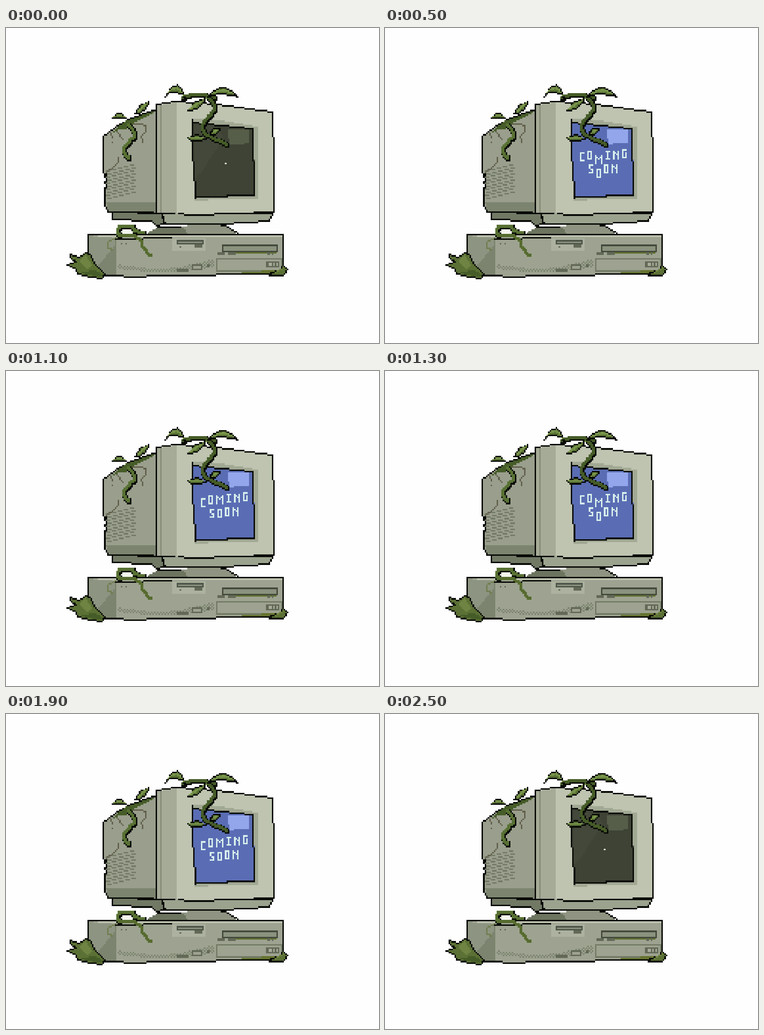
Write an HTML page with a canvas that moves like this. It is 815 px wide and 687 px high and loops after 3000 ms.

```html
<!DOCTYPE html>
<html lang="en">
<head>
<meta charset="utf-8">
<title>Coming soon</title>
<style>
html, body { margin: 0; width: 100%; height: 100%; overflow: hidden; background: #fefefe; }
canvas { display: block; width: 100vw; height: 100vh; image-rendering: pixelated; }
</style>
</head>
<body>
<canvas id="stage" width="247" height="208" role="img" aria-label="Overgrown computer: coming soon"></canvas>
<script>
const ctx = document.getElementById('stage').getContext('2d');
const CELL = 3.3, LOOP = 3000, STEP = 100;
const BLACK = '#080a06', DEEP = '#465c28', LEAF = '#587133', LIGHT = '#78944a';
const FRONT = '#9da390', SIDE = '#9a9f8d', SHADE = '#7c846f', BEZEL = '#bec4b0', MARK = '#626956';
const cell = v => Math.floor(v / CELL);
const points = p => typeof p === 'string' ? p.split(' ').map(xy => xy.split(',').map(Number)) : p;

function dot(x, y, color, w = 1, h = 1) {
  ctx.fillStyle = color;
  ctx.fillRect(x, y, w, h);
}

// Shapes use stage coordinates and land on whole art pixels.
function fill(outline, color, test) {
  const pts = points(outline).map(([x, y]) => [x / CELL, y / CELL]);
  const ys = pts.map(p => p[1]);
  for (let y = Math.floor(Math.min(...ys)); y <= Math.max(...ys); y++) {
    const hits = [];
    pts.forEach(([x1, y1], i) => {
      const [x2, y2] = pts[(i + 1) % pts.length], c = y + .5;
      if ((y1 <= c) !== (y2 <= c)) hits.push(x1 + (c - y1) * (x2 - x1) / (y2 - y1));
    });
    hits.sort((a, b) => a - b);
    for (let i = 0; i < hits.length; i += 2) {
      const a = Math.round(hits[i]), b = Math.round(hits[i + 1]);
      if (!test) dot(a, y, color, b - a);
      else for (let x = a; x < b; x++) if (test(x, y)) dot(x, y, color);
    }
  }
}

function stroke(cells, color, width = 1) {
  const r = Math.floor(width / 2);
  for (let i = 1; i < cells.length; i++) {
    const [x1, y1] = cells[i - 1], [x2, y2] = cells[i];
    const n = Math.max(Math.abs(x2 - x1), Math.abs(y2 - y1), 1);
    for (let k = 0; k <= n; k++)
      dot(Math.round(x1 + (x2 - x1) * k / n) - r, Math.round(y1 + (y2 - y1) * k / n) - r, color, width, width);
  }
}

const line = (path, color = BLACK, width) => stroke(points(path).map(p => p.map(cell)), color, width);

function box(x, y, w, h, color, inner) {
  const a = cell(x), b = cell(y), c = Math.round(w / CELL), d = Math.round(h / CELL);
  dot(a, b, color, c, d);
  if (inner) dot(a + 1, b + 1, inner, c - 2, d - 2);
}

function shape(outline, color) {
  const pts = points(outline);
  fill(pts, color);
  line([...pts, pts[0]]);
}

// Catmull-Rom curve through a few points
function smooth(path) {
  const p = points(path), curve = [];
  for (let i = 0; i < p.length - 1; i++) {
    const [a, b, c, d] = [p[i - 1] || p[i], p[i], p[i + 1], p[i + 2] || p[i + 1]];
    for (let t = 0; t < 1; t += .2)
      curve.push([0, 1].map(k => b[k] + t / 2 * (c[k] - a[k]
        + t * (2 * a[k] - 5 * b[k] + 4 * c[k] - d[k] + t * (3 * (b[k] - c[k]) + d[k] - a[k])))));
  }
  return [...curve, p[p.length - 1]];
}

function vine(path, core = LEAF) {
  const curve = smooth(path);
  line(curve, BLACK, 3);
  line(curve, core, 2);
}

// A leaf swells around an arched spine, lit along its upper half.
function leaf(x1, y1, x2, y2, width, bend = 0) {
  const dx = x2 - x1, dy = y2 - y1, len = Math.hypot(dx, dy);
  const at = (t, side) => {
    const off = bend * 4 * t * (1 - t) + side * width * Math.sin(Math.PI * t);
    return [x1 + dx * t - dy / len * off, y1 + dy * t + dx / len * off];
  };
  const steps = Array.from({ length: 11 }, (_, i) => i / 10);
  const blade = (top, bottom) => [...steps.map(t => at(t, top)), ...steps.map(t => at(1 - t, bottom))];
  shape(blade(-1, 1), LEAF);
  fill(blade(-.6, .2), LIGHT);
}

function drawCase() {
  fill('181,451 605,451 605,537 455,537 305,542 215,541 181,510', FRONT);
  fill('181,453 241,458 241,542 215,541 181,505', '#8d9481');
  fill('241,470 241,542 215,541 200,520', SHADE);
  fill('183,452 604,452 604,457 240,457', '#bcc2ae');
  fill('243,515 320,525 375,522 455,504 455,520 395,530 320,532 243,525', SHADE, (x, y) => (x + y) % 2);

  box(366, 459, 73, 26, '#acb29f');
  box(373, 462, 59, 11, '#50574a', '#8a917d');
  box(380, 476, 3.3, 3.3, MARK);
  box(413, 475, 17, 8, MARK, '#a8ae9b');
  box(472, 472, 122, 17, '#444a3c', '#8b927e');
  line('500,490 588,490', '#61702f');
  [462, 488].forEach(x => box(x, 491, 18, 8, MARK, FRONT));
  [571, 577, 584].forEach(x => box(x, 491, 3.3, 7, MARK));

  box(459, 502, 144, 30, '#747c67', FRONT);
  box(568, 509, 29, 13, MARK, '#a6ac99');
  [574, 581, 588].forEach(x => box(x, 512, 3.3, 7, MARK));
  line('520,535 600,532', '#64732f', 2);
  box(376, 525, 27, 7, MARK);
  box(409, 515, 23, 13, MARK, FRONT);
  box(439, 515, 7, 8, MARK);
  [251, 262].forEach(x => box(x, 469, 3.3, 3.3, MARK));

  line('240,459 240,540', SHADE);
  line('181,497 181,451 605,451 605,516');
  line('240,459 362,457');
  line('213,540 305,542 308,540 453,540 460,537 575,537');
}

function drawMonitor() {
  fill('304,450 326,437 385,431 470,428 487,437 507,450', '#8e9481');
  fill('304,450 326,437 385,434 400,450', '#6c745f');
  line('470,430 480,430 508,448');
  line('332,434 382,434');

  shape('214,237 239,216 268,199 327,180 329,402 222,400 216,386 219,318 214,315', SIDE);
  fill('219,380 327,380 327,401 224,400', SHADE);
  shape('232,402 340,403 346,427 328,430 318,422 234,417', '#717965');
  shape('340,404 581,404 577,422 470,427 347,428', '#9ba28e');

  shape('327,168 372,159 460,166 583,184 586,292 586,402 410,407 329,402', BEZEL);
  fill('331,169 372,162 372,400 378,405 331,401', '#a5ab97');
  line('338,170 338,401', '#858c77');
  fill('407,198 460,200 550,215 550,373 413,375', '#a1a893');

  for (let row = 0; row < 10; row++)
    for (let col = 0; col < 5; col++)
      box(221 + col * 13.2 + row % 2 * 3.3, 313 - col * 3.3 + row * 6.6, 10, 3.3, '#747b67');
  for (let y = 322; y < 374; y += 13.2) box(216, y, 3.3, 6.6, BLACK);

  ['275,208 298,208 305,213 305,226 296,235 298,249', '245,282 245,291 235,303 220,314',
   '228,228 232,239', '240,222 256,242', '232,248 232,248'].forEach(p => line(p, '#62604c'));
}

// The picture opens from the middle line in four steps and closes the same way.
function drawScreen(step) {
  const glass = '409,207 540,219 543,292 543,366 484,366 484,369 413,369 409,290';
  const open = Math.min(step, 24 - step, 4);
  fill(glass, '#3e4335');
  fill('412,210 460,214 475,240 430,310 412,330', '#43483a');
  fill('485,222 530,222 530,252 488,254', '#565d48');
  if (open === 4) {
    fill(glass, '#5a6db4');
    fill('485,221 530,221 530,251 488,253', '#94a6eb');
  } else if (open > 0) {
    const half = open === 1 ? 2 : 19.5 * open, top = 291 - half, bottom = 291 + half;
    fill([[411, top], [541, top], [541, bottom], [412, bottom]], '#5a6db4');
  }
  if (open > 1) drawText(step);
  if (step < 1 || step > 24) dot(145, 89, '#eef1e8');
  line('407,200 407,288 412,293 412,330 414,335 414,371');
  line('414,368 483,368 485,365 543,365 543,292 540,289 540,219 505,216 440,209 409,207');
}

// Letters are strokes on a small grid, six rows high.
const GLYPHS = {
  C: '2,0 0,0 0,5 2,5', O: '0,0 2,0 2,5 0,5 0,0', M: '0,5 0,0 2,2 4,0 4,5', I: '0,0 2,0 1,0 1,5 0,5 2,5',
  N: '0,5 0,0 3,3 3,0 3,5', G: '2,0 0,0 0,5 2,5 2,2', S: '2,0 0,0 0,2 2,3 2,5 0,5'
};

// A dip runs through the columns every 800 ms, each letter hopping up behind it.
function drawText(step) {
  const phase = (step + 5) % 8;
  const word = (text, x, y, first) => [...text].forEach((letter, i) => {
    const col = first + i, since = phase - Math.min(col, 4);
    const top = Math.round(y - .4 * col) + (since === 0 ? 2 : since === 1 ? -1 : 0);
    const path = points(GLYPHS[letter]);
    stroke(path.map(([px, py]) => [x + px, top + py]), '#d9f0ed');
    x += Math.max(...path.map(p => p[0])) + 3;
  });
  word('COMING', 129, 82.4, 0);
  word('SOON', 135, 91.6, 1);
}

function drawPlants() {
  // Side of the monitor
  fill('228,231 260,203 322,179 322,186 279,207 278,218 248,221', DEEP);
  line('266,198 322,179');
  vine('270,212 283,235 264,255 260,272 269,285');
  leaf(233, 195, 263, 195, 5, -4);
  leaf(283, 188, 312, 161, 6);

  // Top of the monitor
  vine('388,154 410,147 438,148 456,152', DEEP);
  vine('440,151 456,169 452,186 433,207 433,228 451,240 484,255', DEEP);
  leaf(348, 149, 391, 155, 7, -20);
  leaf(442, 149, 506, 150, 7, -12);
  leaf(397, 181, 438, 153, 7);
  leaf(398, 240, 436, 241, 7);
  leaf(446, 233, 467, 219, 6);

  // On the case
  line(smooth('238,458 223,466 224,479 234,483'), '#727e52');
  fill('250,440 275,438 284,449 252,451', '#f4f5ee');
  vine('302,447 286,444 275,434 253,434 246,445 250,453');
  line(smooth('251,453 287,457 303,480 317,498'), '#566b2e', 2);

  // Around its feet
  shape('135,517 154,510 140,500 141,494 160,499 172,490 184,493 193,512 215,536 211,545 185,543 158,537 151,522', '#5b7034');
  fill('160,507 174,494 188,518 178,528', '#6f8443');
  fill('160,534 195,527 211,538 208,543', DEEP);
  shape('575,540 579,533 594,530 605,516 615,527 606,540', '#5b7034');
  line('588,534 606,524', '#70843f');
}

let shown = -1;
function play() {
  const step = Math.floor(performance.now() % LOOP / STEP);
  if (step !== shown) {
    shown = step;
    dot(0, 0, '#fefefe', 247, 208);
    drawCase();
    drawMonitor();
    drawScreen(step);
    drawPlants();
  }
  requestAnimationFrame(play);
}
play();
</script>
</body>
</html>
```
